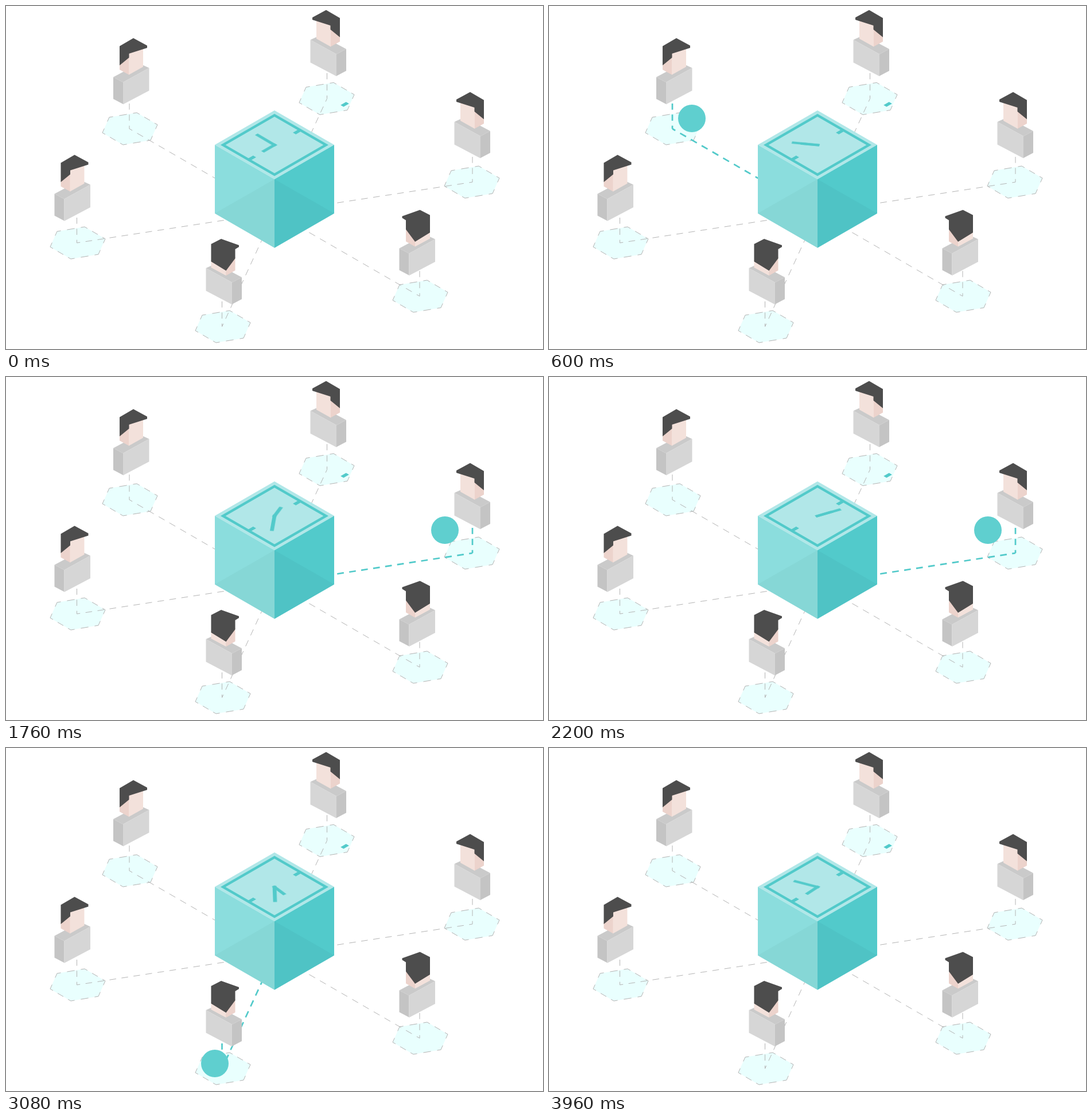
These frames come from a looping animation (936x598 px, 4 s). An HTML page:

```html
<!DOCTYPE html>
<html lang="en">
<head>
<meta charset="utf-8">
<title>Timed payments</title>
<style>
  html, body { margin: 0; width: 100%; height: 100%; overflow: hidden; background: #fff; }
  svg { display: block; width: 100vw; height: 100vh; }
  .link { fill: none; stroke: #b3b3b3; stroke-width: 1; }
  .pulse { animation: pulse 4s step-end infinite; }
  .pulse .link { stroke: #52caca; stroke-width: 2.7; }
  .teal { fill: none; stroke: #52caca; }
  .hand { stroke-width: 5.5; animation: turn 4s linear infinite; }
  .long { --from: 270deg; --to: 2430deg; }
  .short { --from: 180deg; --to: 540deg; }
  @keyframes turn {
    from { transform: rotate(var(--from)); }
    to { transform: rotate(var(--to)); }
  }
  @keyframes pulse {
    0% { opacity: 1; }
    12%, 100% { opacity: 0; }
  }
</style>
</head>
<body>
<svg viewBox="0 0 936 598">
  <defs>
    <g id="torso">
      <path fill="#cacaca" d="M187 124L232 100L249.5 108L204 133Z"/>
      <path fill="#c4c4c4" d="M187 124L204 133V171L187 162Z"/>
      <path fill="#d6d6d6" d="M204 133L249.5 108V147.500L204 171.500Z"/>
    </g>
    <g id="front">
      <use href="#torso"/>
      <path fill="#ecd3cc" d="M198 100L214.500 82V120L198 111Z"/>
      <path fill="#f3e1db" d="M214 80L239 70V106L214 120Z"/>
      <path fill="#4d4d4d" d="M198 70L222 56L246 69V73L214.500 83V90L198 103.500Z"/>
    </g>
    <g id="back">
      <use href="#torso"/>
      <path fill="#ecd3cc" d="M198.500 88L214.500 110V121L198.500 112Z"/>
      <path fill="#f3e1db" d="M214.500 110L240.500 94V107L214.500 121Z"/>
      <path fill="#4d4d4d" d="M192 68L223 57L240.500 66V96.500L214.500 112.500L198.500 91V75L192 71Z"/>
    </g>
  </defs>

  <g id="pads"></g>
  <g id="links"></g>
  <g id="people"></g>

  <g id="cube">
    <path fill="#b1e7e8" d="M364 242L468 182L572 242L468 302Z"/>
    <path fill="#8bdddd" d="M364 242L468 302V421.500L364 361.500Z"/>
    <path fill="#86d7d6" d="M468 302V421.500L364 361.500Z"/>
    <path fill="#52cacb" d="M468 302L572 242V361.500L468 421.500Z"/>
    <path fill="#4fc3c5" d="M468 302L572 361.500L468 421.500Z"/>
    <g class="teal" transform="matrix(.866 .5 -.866 .5 468 242.300)">
      <rect x="-51.800" y="-51.800" width="103.600" height="103.600" stroke-width="5"/>
      <path stroke-width="6" d="M0 -52V-40M0 52V40M0 -147V-136"/>
      <path class="hand long" d="M0 2.750V-37"/>
      <path class="hand short" d="M0 2.750V-24"/>
    </g>
  </g>
  <g id="coins"></g>
</svg>

<script>
  // pad: platform centre, stem and top: x and upper end of the vertical line
  const users = [
    { pad: [216, 214], stem: 215, top: 170, look: 'front', at: [0, 0],
      coin: [249, 196], start: 400 },
    { pad: [559, 161.5], stem: 559.5, top: 117, look: 'front', at: [780, -49], flip: true },
    { pad: [812, 307], stem: 813, top: 263, look: 'front', at: [1031, 94], flip: true,
      coin: [765, 267], start: 1733 },
    { pad: [125, 413], stem: 123.5, top: 369, look: 'front', at: [-102.5, 203.5] },
    { pad: [722, 506], stem: 721, top: 462, look: 'back', at: [498.5, 298.5] },
    { pad: [378, 559], stem: 376.5, top: 515, look: 'back', at: [598, 349], flip: true,
      coin: [364, 550], start: 3067 }
  ];
  const hub = [468, 360];
  const hexagon = [[-36, -20], [12, -28], [48, -7], [36, 20], [-12, 28], [-48, 7]];
  const dashPeriod = 21.3;
  const dashShare = 0.55;

  function add(parent, tag, attrs) {
    const node = document.createElementNS('http://www.w3.org/2000/svg', tag);
    for (const key in attrs) node.setAttribute(key, attrs[key]);
    return parent.appendChild(node);
  }

  // Dashes are fitted so that corners carry half a dash and open ends a full one.
  // span is how many times longer the whole line is than the drawn part.
  function dashed(parent, a, b, { open = false, span = 1 } = {}) {
    const length = span * Math.hypot(b[0] - a[0], b[1] - a[1]);
    const extra = open ? dashShare / 2 : 0;
    const period = length / (Math.max(1, Math.round(length / dashPeriod - extra)) + extra);
    const dash = period * dashShare;
    add(parent, 'path', {
      class: 'link',
      d: `M${a}L${b}`,
      'stroke-dasharray': `${dash} ${period - dash}`,
      'stroke-dashoffset': open ? 0 : dash / 2
    });
  }

  // Each link is half of a line that runs under the cube to the opposite user.
  function link(parent, user) {
    const corner = [user.stem, user.pad[1]];
    dashed(parent, [user.stem, user.top], corner, { open: true });
    dashed(parent, corner, hub, { span: 2 });
  }

  function pulse(parent, start) {
    const group = add(parent, 'g', { class: 'pulse' });
    group.style.animationDelay = `${start - 4000}ms`;
    return group;
  }

  const [pads, links, people, coins] = ['pads', 'links', 'people', 'coins']
    .map(id => document.getElementById(id));

  for (const user of users) {
    const corners = hexagon.map(([x, y]) => [user.pad[0] + x, user.pad[1] + y]);
    add(pads, 'polygon', { points: corners.join(' '), fill: '#e9fffe' });
    corners.forEach((corner, i) => dashed(pads, corner, corners[(i + 1) % 6]));
    link(links, user);
    add(people, 'use', {
      href: '#' + user.look,
      transform: `translate(${user.at}) scale(${user.flip ? -1 : 1} 1)`
    });
    if (user.coin) {
      link(pulse(links, user.start), user);
      const [cx, cy] = user.coin;
      add(pulse(coins, user.start), 'circle', { cx, cy, r: 24, fill: '#5fcfcf' });
    }
  }
</script>
</body>
</html>
```
